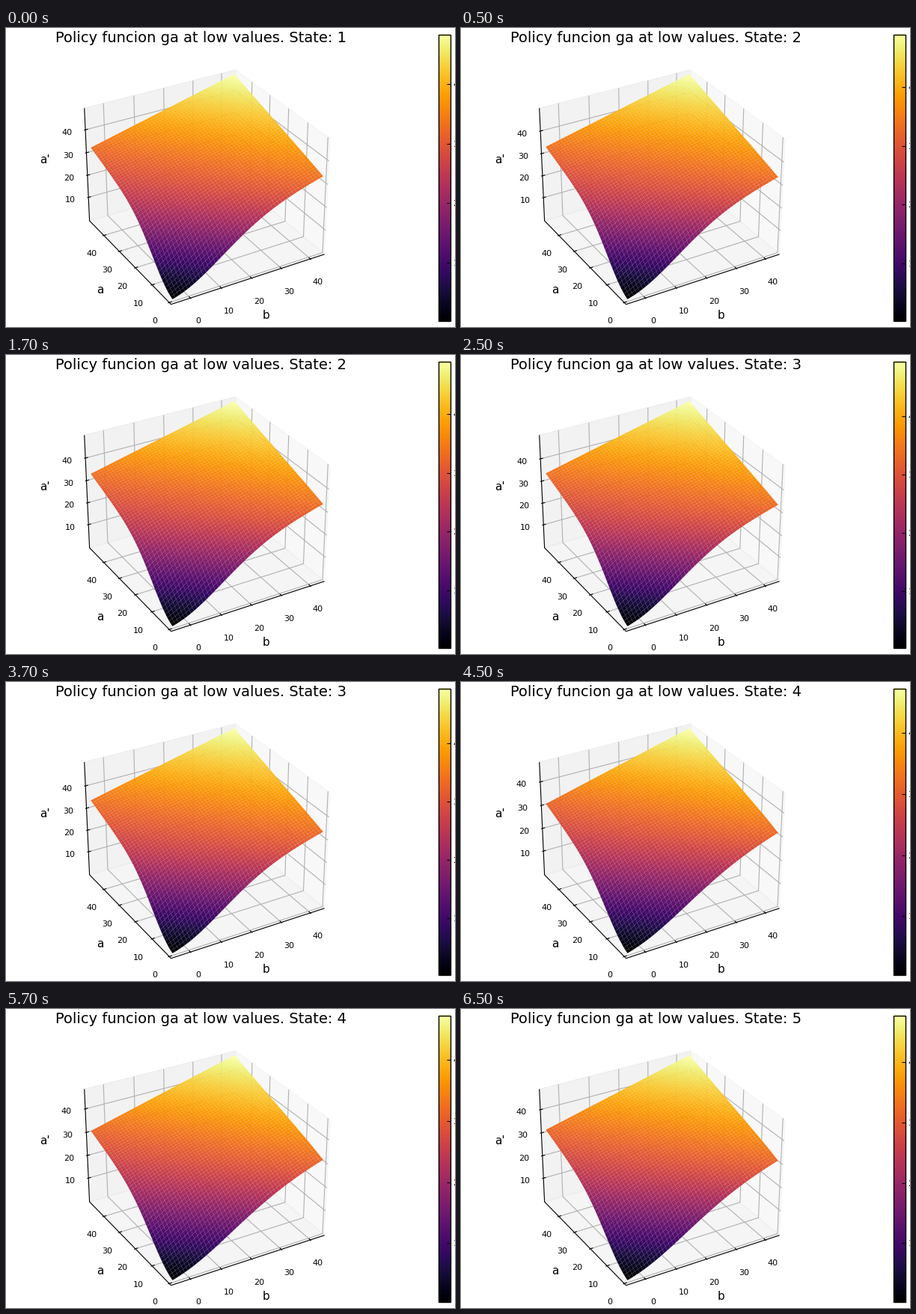
A matplotlib script for the animation above (8 s loop, 600 px wide and 400 px high).

```python
import numpy as np
import matplotlib.pyplot as plt
from matplotlib.animation import FuncAnimation
from matplotlib.collections import LineCollection, PolyCollection

plt.rcParams["font.family"] = "DejaVu Sans"

W, H, DPI = 600, 400, 100
CELLS = 50
PAD = 0.02                      # gap between the data limits and the box
B_MIN, B_MAX = -5.14, 43.9
A_MIN, A_MAX = 0, 48.5
GRID = "#b0b0b0"
LINE = 0.8

# lowest value, highest value, value at max a, value at max b, bend along a, bend along b
STATES = [
    (0.2, 48.3, 32.5, 33.4, 0.33, 0.465),
    (0.2, 48.95, 33.3, 33.5, 0.33, 0.465),
    (0.2, 49.4, 33.8, 33.5, 0.33, 0.465),
    (0.3, 47.3, 30.9, 32.1, 0.36, 0.55),
    (0.25, 47.7, 31.6, 32.0, 0.36, 0.55),
]


def to_box(value, low, high):
    return PAD + (1 - 2 * PAD) * (value - low) / (high - low)


def project(b, a, z):
    """Perspective view of box coordinates (0..1) in stage pixels."""
    x, y = (np.asarray(b) - 0.5) * 1.19048, (np.asarray(a) - 0.5) * 1.19048
    z = (np.asarray(z) - 0.5) * 0.89286
    azim, elev = np.radians([-120, 30])
    ca, sa, ce, se = np.cos(azim), np.sin(azim), np.cos(elev), np.sin(elev)
    right = -sa * x + ca * y
    up = -se * (ca * x + sa * y) + ce * z
    depth = 10 - ce * (ca * x + sa * y) - se * z
    return np.stack([265.7 + 1973 * right / depth,
                     205.3 - 1973 * up / depth], axis=-1)


def path(*points):
    return project(*np.array(points, float).T)


def policy(a, b, low, high, left, right, bend_a, bend_b):
    base = left + right - high
    plane = base + (left - base) * a + (right - base) * b
    return plane - (base - low) * np.exp(-(a / bend_a + b / bend_b) ** 2)


def lines(segments, color, zorder):
    return ax.add_collection(LineCollection(
        segments, colors=color, linewidths=LINE, zorder=zorder), autolim=False)


def label(x, y, text, size=8, ha="center"):
    return ax.text(x, y, text, size=size, ha=ha, va="baseline", zorder=6)


def draw_box():
    panes = [
        (0.90, [(0, 1, 0), (1, 1, 0), (1, 1, 1), (0, 1, 1)]),
        (0.95, [(1, 0, 0), (1, 1, 0), (1, 1, 1), (1, 0, 1)]),
        (0.925, [(0, 0, 0), (1, 0, 0), (1, 1, 0), (0, 1, 0)]),
    ]
    for gray, corners in panes:
        ax.add_patch(plt.Polygon(path(*corners), color=str(gray), alpha=0.5, lw=1, zorder=0))

    grid, ticks = [], []
    for value in range(0, 50, 10):
        b, a = to_box(value, B_MIN, B_MAX), to_box(value, A_MIN, A_MAX)
        grid += [path((b, 0, 0), (b, 1, 0), (b, 1, 1)),
                 path((0, a, 0), (1, a, 0), (1, a, 1))]
        ticks += [path((b, -0.0083, 0), (b, 0.0167, 0)),
                  path((-0.0083, a, 0), (0.0167, a, 0))]
        x, y = project(b, 0, 0)
        label(x + 10, y + 34, value)
        x, y = project(0, a, 0)
        label(x - 19 + 0.08 * value, y + 28, value)
    lines(grid, GRID, 1)
    lines(ticks, "black", 4)
    lines([path((0, 1, 1), (0, 1, 0), (0, 0, 0), (1, 0, 0))], "black", 4)
    label(348, 389, "b", 11)
    label(126, 355, "a", 11)
    label(52, 181, "a'", 11)


def draw_colorbar():
    ramp = np.linspace(1, 0, 256)[:, None]
    ax.imshow(ramp, cmap="inferno", extent=(577.5, 593.5, 392.3, 8.7),
              aspect="auto", interpolation="nearest", zorder=2)
    ax.add_patch(plt.Rectangle((577.5, 8.7), 16, 383.6, fill=False, lw=LINE + 0.2, zorder=5))


def draw_state(number, params):
    low, high = params[:2]
    s = np.linspace(0, 1, CELLS + 1)
    b, a = np.meshgrid(s, s)
    value = policy(a, b, *params)
    inset = lambda t: PAD + (1 - 2 * PAD) * t
    points = project(inset(b), inset(a), to_box(value, low, high))

    def corners(m):
        return np.stack([m[:-1, :-1], m[:-1, 1:], m[1:, 1:], m[1:, :-1]], axis=2)

    quads = corners(points).reshape(-1, 4, 2)[::-1]
    shade = corners(value).mean(axis=2).ravel()[::-1]
    surface = PolyCollection(quads, array=shade, cmap="inferno",
                             edgecolors="none", linewidths=0, zorder=3)
    surface.set_clim(shade.min(), shade.max())
    ax.add_collection(surface, autolim=False)
    artists = [surface, label(261, 19, f"Policy funcion ga at low values. State: {number}", 14)]

    grid, ticks = [], []
    for v in range(10, 50, 10):
        z = to_box(v, low, high)
        grid.append(path((0, 1, z), (1, 1, z), (1, 0, z)))
        ticks.append(path((-0.0083, 1, z), (0.0167, 1, z)))
        x, y = project(0, 1, z)
        artists.append(label(x - 24 - v / 40, y + 6.7, v))
        bar_y = 392.3 - 383.6 * (v - low) / (high - low)
        ticks.append([(589, bar_y), (593.5, bar_y)])
        artists.append(label(597.5, bar_y + 4, v, ha="left"))
    return artists + [lines(grid, GRID, 1), lines(ticks, "black", 4)]


fig = plt.figure(figsize=(W / DPI, H / DPI), dpi=DPI, facecolor="white")
ax = fig.add_axes([0, 0, 1, 1])
draw_box()
draw_colorbar()
groups = [draw_state(i + 1, params) for i, params in enumerate(STATES)]
ax.set(xlim=(0, W), ylim=(H, 0))
ax.axis("off")


def update(frame):
    current = (frame + 3) // 4
    for i, group in enumerate(groups):
        for artist in group:
            artist.set_visible(i == current)
    return groups[current]


update(0)
animation = FuncAnimation(fig, update, frames=16, interval=500, repeat=True)
plt.show()
```
